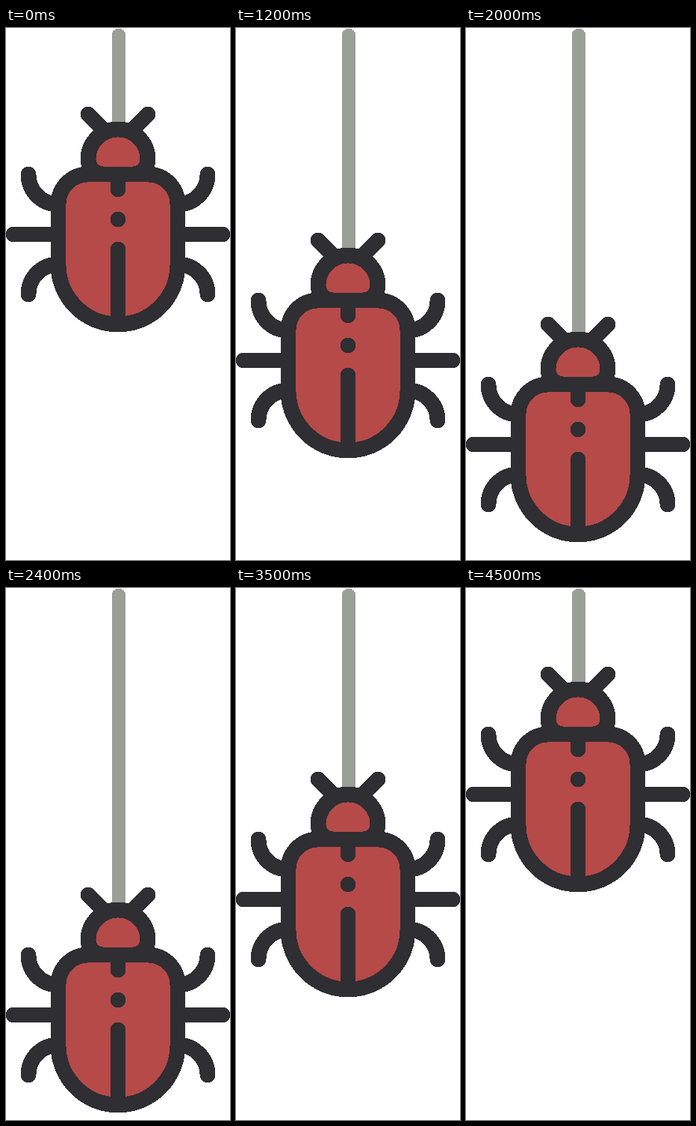
An HTML page that plays this animation: 300 by 709 pixels, repeating every 4600 ms.

```html
<!DOCTYPE html>
<html lang="en">
<head>
<meta charset="utf-8">
<title>Beetle on a thread</title>
<style>
  html, body { margin: 0; width: 100%; height: 100%; overflow: hidden; background: #fff; }
  svg { display: block; width: 100%; height: 100%; shape-rendering: crispEdges; }
  path { fill: none; stroke-linecap: round; }
  /* Slightly over-wide strokes keep straight edges on the pixel grid and fill partly covered curve pixels. */
  #thread { stroke: #9a9f98; stroke-width: 18.9; }
  #beetle { stroke: #2f2e33; stroke-width: 20.9; }
  #beetle .shell { fill: #b64a48; }
</style>
</head>
<body>
<svg viewBox="0 0 300 709">
  <path id="thread"/>
  <g id="beetle">
    <path d="M110 115L132 137M190 115L168 137"/>
    <path d="M30 195A40 40 0 0 0 70 235M270 195A40 40 0 0 1 230 235"/>
    <path d="M10 275H70M290 275H230"/>
    <path d="M30 355A40 40 0 0 1 70 315M270 355A40 40 0 0 0 230 315"/>
    <path class="shell" d="M110 175A40 40 0 0 1 190 175A20 20 0 0 1 170 195H130A20 20 0 0 1 110 175Z"/>
    <path class="shell" d="M70 315V235A40 40 0 0 1 110 195H190A40 40 0 0 1 230 235V315A80 80 0 0 1 70 315Z"/>
    <path d="M150 200V215M150 255V255.01M150 295V390"/>
  </g>
</svg>
<script>
  const STEP_MS = 100, STEPS = 46, STEP_PX = 14;
  const thread = document.getElementById('thread');
  const beetle = document.getElementById('beetle');
  const start = performance.now();

  function draw(time) {
    const step = Math.floor(time / STEP_MS) % STEPS;
    const drop = STEP_PX * Math.min(step, STEPS - 1 - step);
    thread.setAttribute('d', `M151 10V${130 + drop}`);
    beetle.setAttribute('transform', `translate(0 ${drop})`);
  }

  function tick() {
    draw(performance.now() - start);
    requestAnimationFrame(tick);
  }
  tick();
</script>
</body>
</html>
```
